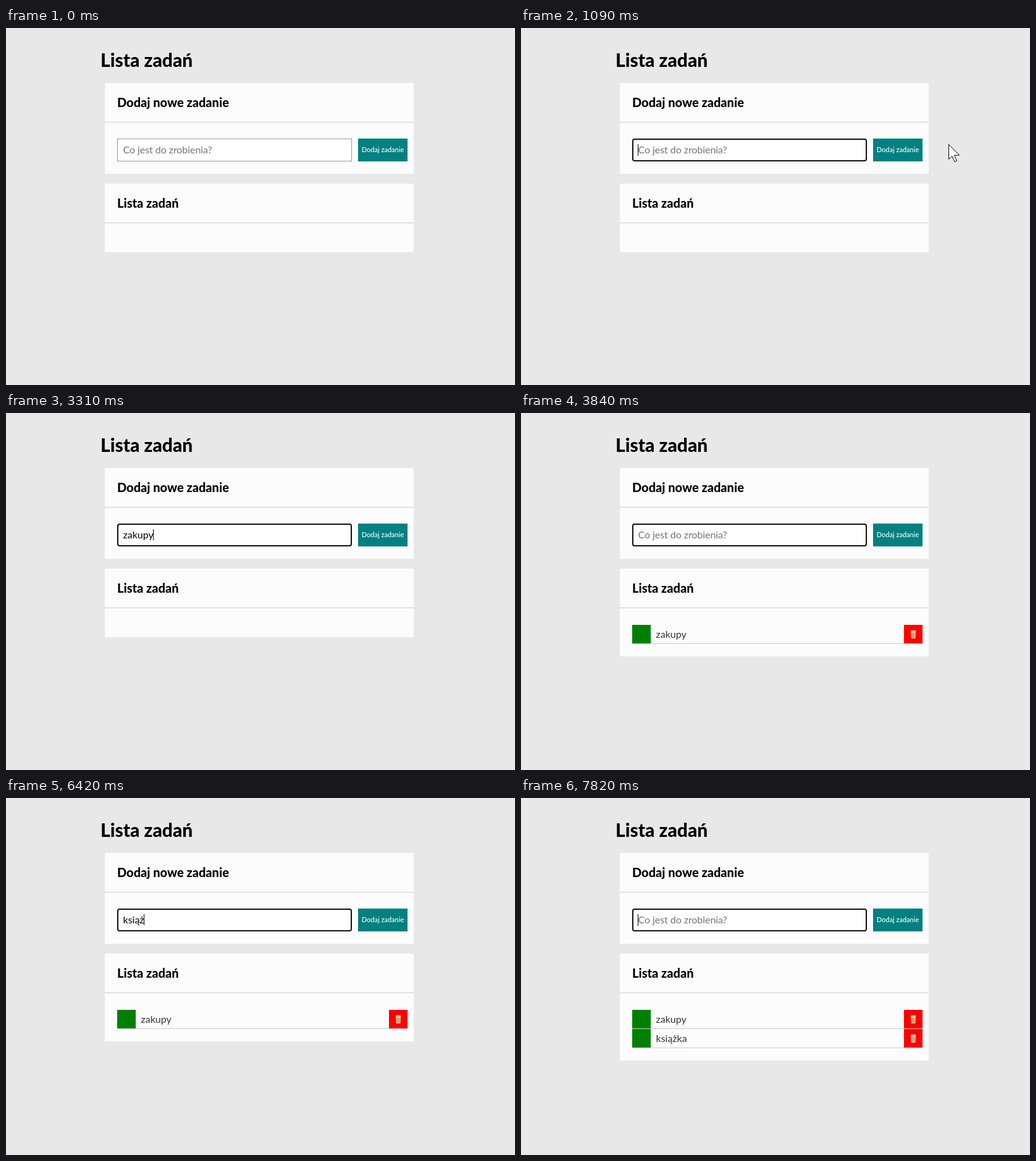
These frames come from a looping animation (824x578 px, 8000 ms). An HTML page with a canvas:

```html
<!DOCTYPE html>
<html lang="pl">
<head>
<meta charset="utf-8">
<title>Lista zadań</title>
<style>
  html, body { margin: 0; width: 100%; height: 100%; overflow: hidden; background: #e8e8e8; }
  body { position: relative; font: 16px/20px Lato, sans-serif; color: #000; }
  body *, canvas { position: absolute; box-sizing: border-box; margin: 0; white-space: pre; }
  h1 { left: 153px; top: 32px; font: 800 30px/38px Lato, sans-serif; }
  section { left: 160px; width: 500px; background: #fcfcfc; }
  h2 { left: 0; top: 0; width: 500px; height: 64px; padding-left: 20px; border-bottom: 1px solid #ccc;
       font: 800 20px/63px Lato, sans-serif; }
  #add { top: 89px; height: 147px; }
  #list { top: 252px; }
  #field { left: 20px; top: 90px; width: 380px; height: 37px; border: 1px solid #959a96; background: #fff; }
  #field.focus { border: 2px solid #101010; border-radius: 4px; }
  #hint, #typed { left: 29.5px; top: 98px; }
  #hint { color: #707570; letter-spacing: -.06px; }
  #caret { left: 100%; top: 1px; margin-left: -1px; width: 1px; height: 19px; background: #000; }
  #button { left: 410px; top: 90px; width: 80px; height: 37px; background: #008080; color: #fff;
            font-size: 11px; font-weight: 500; line-height: 36px; text-align: center; }
  .row { left: 20px; width: 470px; height: 31px; border-bottom: 1px solid #ccc; color: #2c382e; }
  .row span { left: 38.5px; top: 5px; }
  .row i { top: 0; width: 30px; height: 30px; background: #008000; }
  .row i + i { left: 440px; background: #f00; }
  .row svg { left: 451px; top: 9px; }
</style>
</head>
<body>
<h1>Lista zadań</h1>
<section id="add">
  <h2>Dodaj nowe zadanie</h2>
  <div id="field"></div>
  <div id="hint">Co jest do zrobienia?</div>
  <div id="typed"><span id="text" style="position:static"></span><b id="caret"></b></div>
  <div id="button">Dodaj zadanie</div>
</section>
<section id="list"><h2>Lista zadań</h2></section>
<canvas id="pointer" width="824" height="578" style="left:0;top:0"></canvas>
<script>
const LOOP = 8000, BLINK = 530, FOCUS = 820;
const tasks = [
  { name: 'zakupy', keys: [1950, 2370, 2640, 2830, 3090, 3310], sent: 3770 },
  { name: 'książka', keys: [5230, 5430, 5690, 6020, 6420, 6610, 6760], sent: 7480 }
];
const $ = id => document.getElementById(id);
const ctx = $('pointer').getContext('2d');

const bin = `<svg width="8" height="13" viewBox="0 0 8 13">
  <path d="M0 1.5h8L7.4 13H.6Z" fill="#e3c9a0"/><rect width="8" height="3" rx="1.2" fill="#f2e2c4"/>
  <path d="M1 1.5h6M2.4 4v8M4 4v8M5.6 4v8" stroke="#a8734a" stroke-width=".7"/></svg>`;
tasks.forEach((task, i) => {
  task.row = document.createElement('div');
  task.row.className = 'row';
  task.row.style.top = 91 + 31 * i + 'px';
  task.row.innerHTML = `<i></i><i></i><span>${task.name}</span>${bin}`;
  $('list').append(task.row);
});

function typedAt(t) {
  const task = tasks.find(k => t >= k.keys[0] && t < k.sent);
  return task ? task.name.slice(0, task.keys.filter(k => k <= t).length) : '';
}

// Each key press or focus restarts the blink; sending a task does not.
function caretOn(t) {
  const start = Math.max(FOCUS, ...tasks.flatMap(k => k.keys).filter(k => k <= t));
  return t >= FOCUS && Math.floor((t - start) / BLINK) % 2 === 0;
}

function pointerAt(t) {
  if (t < 70 || t >= 1230) return null;
  if (t < FOCUS) {
    const step = Math.floor((t - 70) / 68) / 10;
    const p = 1 - (1 - step) ** 2;
    return [791 - 253 * p, 556 - 361 * p];
  }
  const p = t < 950 ? 0 : (Math.floor((t - 950) / 70) + 1) / 4;
  return [538 + 230 * p ** 1.4, 188];
}

function drawPointer(t) {
  ctx.clearRect(0, 0, 824, 578);
  const at = pointerAt(t);
  if (!at) return;
  const [x, y] = at.map(Math.round);
  ctx.save();
  ctx.translate(x, y);
  if (x > 180 && x < 560 && y > 179 && y < 216) {
    ctx.fillStyle = '#000';
    ctx.fillRect(-1, -12, 2, 22);
    for (const top of [-13, 10]) {
      ctx.fillRect(-7, top, 6, 2);
      ctx.fillRect(1, top, 6, 2);
    }
  } else {
    ctx.beginPath();
    for (const [px, py] of [[0, 0], [0, 24], [5.5, 19], [9.5, 28], [13, 26.5], [9, 17.5], [17, 17.5]])
      ctx.lineTo(px + .5, py + .5);
    ctx.closePath();
    ctx.fillStyle = '#fff';
    ctx.strokeStyle = '#000';
    ctx.fill();
    ctx.stroke();
  }
  ctx.restore();
}

function render(t) {
  const text = typedAt(t);
  const sent = tasks.filter(k => t >= k.sent).length;
  $('text').textContent = text;
  $('hint').hidden = text !== '';
  $('caret').hidden = !caretOn(t);
  $('caret').style.height = text ? '18px' : '19px';
  $('field').className = t >= FOCUS ? 'focus' : '';
  tasks.forEach((k, i) => k.row.hidden = i >= sent);
  $('list').style.height = 111 + 31 * sent + 'px';
  drawPointer(t);
}

const begin = performance.now();
function tick() {
  render((performance.now() - begin) % LOOP);
  requestAnimationFrame(tick);
}
tick();
</script>
</body>
</html>
```
